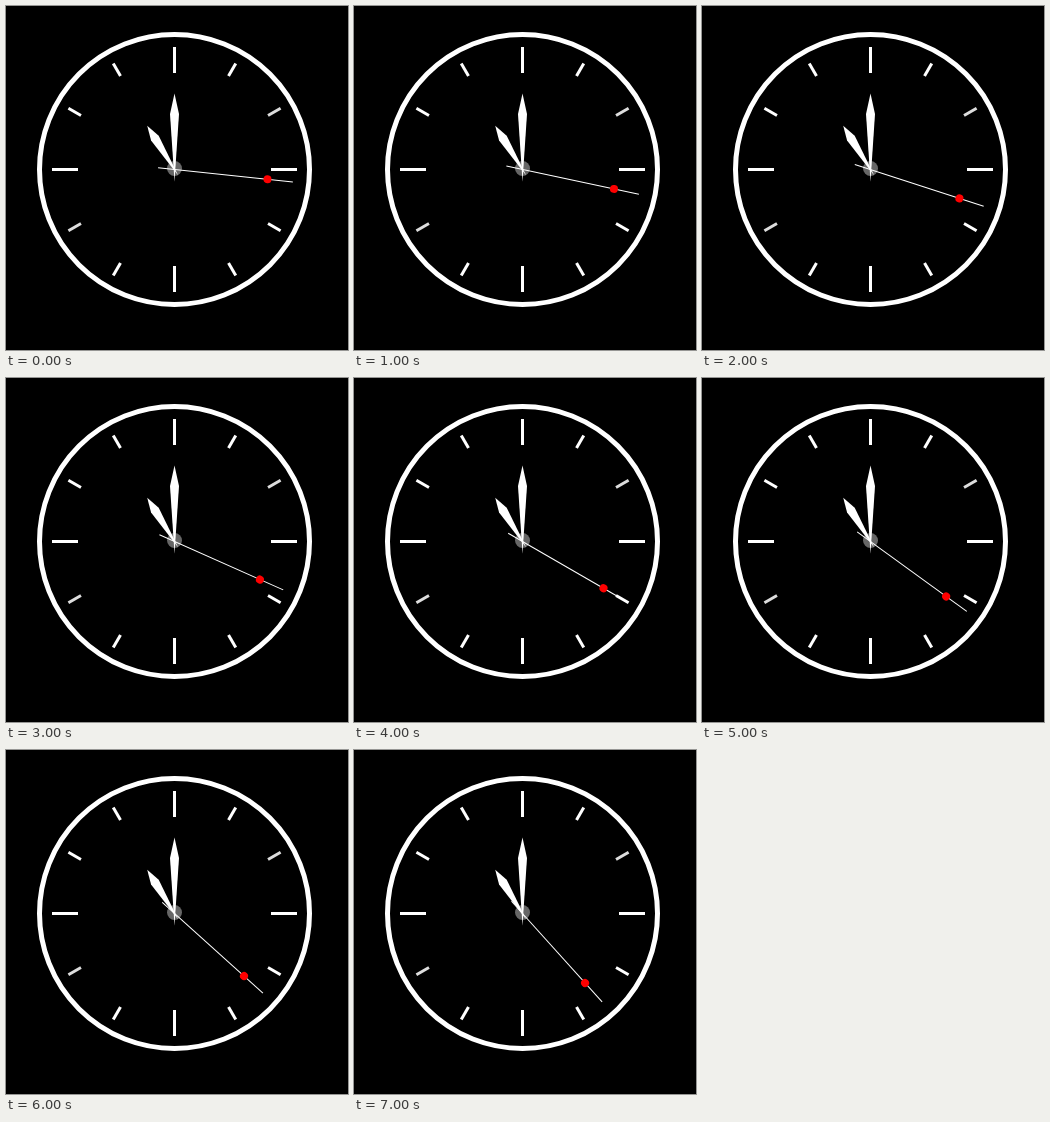
Animation of 342 by 344 pixels, one loop 8000 ms. Source, as an HTML page with a canvas:

```html
<!DOCTYPE html>
<html>
<head>
<meta charset="utf-8">
<title>Clock</title>
<style>
html, body { margin: 0; width: 100%; height: 100%; overflow: hidden; background: #000; }
canvas { display: block; }
</style>
</head>
<body>
<canvas id="stage" width="342" height="344"></canvas>
<script>
const ctx = document.getElementById('stage').getContext('2d');
const LOOP = 8000, START_SECOND = 16;

// Runs paint with the dial centre as origin and "up" turned by the given degrees.
function turned(degrees, paint) {
  ctx.save();
  ctx.translate(168.5, 163.5);
  ctx.rotate(degrees * Math.PI / 180);
  paint();
  ctx.restore();
}

function line(from, to, width, color = '#fff') {
  ctx.strokeStyle = color;
  ctx.lineWidth = width;
  ctx.beginPath();
  ctx.moveTo(0, -from);
  ctx.lineTo(0, -to);
  ctx.stroke();
}

function disc(y, radius, color) {
  ctx.fillStyle = color;
  ctx.beginPath();
  ctx.arc(0, y, radius, 0, 2 * Math.PI);
  ctx.fill();
}

function hand(length, shoulder, halfWidth, tail) {
  ctx.fillStyle = '#fff';
  ctx.beginPath();
  ctx.moveTo(0, -length);
  ctx.lineTo(halfWidth, -shoulder);
  ctx.lineTo(0, tail);
  ctx.lineTo(-halfWidth, -shoulder);
  ctx.fill();
}

function dial() {
  turned(0, () => {
    ctx.strokeStyle = '#fff';
    ctx.lineWidth = 5;
    ctx.beginPath();
    ctx.arc(0, 0, 135, 0, 2 * Math.PI);
    ctx.stroke();
  });
  for (let hour = 0; hour < 12; hour++) {
    const color = hour % 6 === 2 ? '#ddd' : '#fff';
    turned(hour * 30, () => line(hour % 3 ? 108 : 96.5, 122.5, 3, color));
  }
}

function draw(now) {
  const second = START_SECOND + Math.floor(now % LOOP / 1000);
  ctx.fillStyle = '#000';
  ctx.fillRect(0, 0, 342, 344);
  dial();
  turned(0, () => disc(-1, 7.5, '#666'));
  turned(-32, () => hand(51.5, 37, 4.5, 7));
  turned(0, () => hand(76, 55.5, 4.5, 12));
  turned(second * 6, () => {
    line(-16.5, 119, 1);
    disc(-93.5, 4, '#f00');
  });
  requestAnimationFrame(draw);
}
requestAnimationFrame(draw);
</script>
</body>
</html>
```
